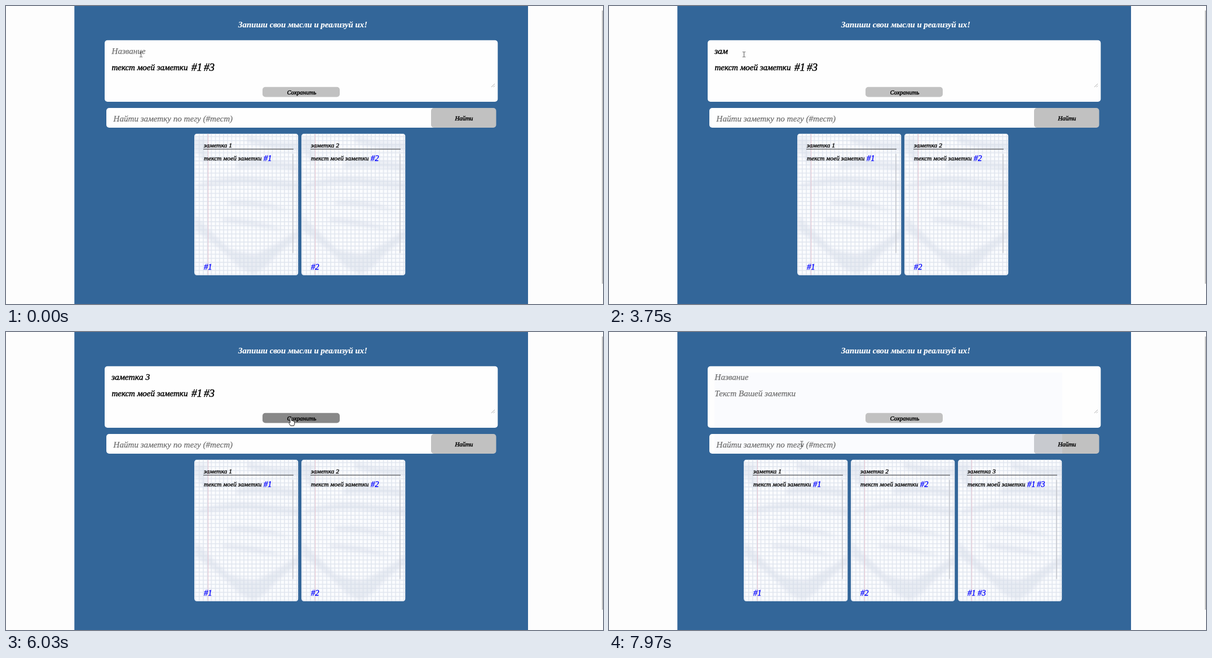
An HTML page that plays this animation: 1059 px wide and 529 px high, repeating every 8000 ms.

```html
<!DOCTYPE html>
<html lang="ru">
<head>
<meta charset="utf-8">
<title>Заметки</title>
<style>
  html, body { margin: 0; height: 100%; overflow: hidden; background: #fdfdfd; }
  svg { display: block; width: 100vw; height: 100vh; }
  text {
    font: italic 15px "Liberation Serif", serif;
    white-space: pre;
    stroke: currentColor; stroke-width: .45px; fill: currentColor;
  }
  .heading { font-size: 14.8px; font-weight: bold; color: #fff; stroke-width: .2px; }
  .hint { font-size: 15.1px; color: #707070; stroke-width: .25px; }
  .button { font-size: 10.9px; text-anchor: middle; }
  .small { font-size: 11.4px; stroke-width: .35px; }
  .tag { font-size: 19px; }
  .blue { font-size: 14.5px; color: #00f; stroke-width: .3px; }
</style>
</head>
<body>
<svg viewBox="0 0 1059 529">
  <defs>
    <pattern id="grid" x="91.6" y="160" width="7.2" height="7.2" patternUnits="userSpaceOnUse">
      <path d="M0 3.6H7.2M3.6 0V7.2" stroke="#d5dce8" stroke-opacity=".75" stroke-width="1.4"/>
    </pattern>
    <filter id="soft" x="-10%" y="-10%" width="120%" height="120%">
      <feGaussianBlur stdDeviation="3"/>
    </filter>
    <clipPath id="sheet"><rect width="184.5" height="251.5" rx="5"/></clipPath>
    <g id="paper" clip-path="url(#sheet)">
      <rect width="184.5" height="252" fill="#fbfcfe"/>
      <g fill="#bcc6da" opacity=".3" filter="url(#soft)">
        <path d="M5 90Q60 72 110 78T185 86V98Q140 94 105 90T5 96Z"/>
        <path d="M75 52Q120 42 182 54V66Q130 56 75 62Z"/>
        <path d="M95 4Q140 18 184 14V30Q140 30 95 16Z"/>
        <path d="M0 8H22V60Q12 35 0 30Z"/>
        <path d="M2 146Q30 175 62 205Q85 212 108 214Q145 200 184 170V186Q150 208 128 236L105 250L80 238Q50 204 2 172Z"/>
        <path d="M60 120Q110 112 170 138Q110 128 60 126ZM50 150Q110 150 160 172Q100 164 50 156Z"/>
      </g>
      <rect width="184.5" height="252" fill="url(#grid)"/>
      <path d="M24.5 0V252" stroke="#e6c3cf"/>
    </g>
    <g id="beam" fill="none" stroke="#444" stroke-width=".9">
      <path d="M-2.5 -4.5H-.8L0 -4L.8 -4.5H2.5M0 -4V4M-2.5 4.5H-.8L0 4L.8 4.5H2.5"/>
    </g>
    <path id="hand" fill="#fff" stroke="#111" stroke-width=".9" stroke-linejoin="round"
      d="M-1.5 -5.5Q0 -7 1 -5V-1Q2.4 -2 3 -.6Q4.5 -1 4.8 .3Q6.3 0 6.3 1.5V4.5L5 8H-.8L-3.7 3Q-3.5 1.2 -1.5 2.5Z"/>
    <path id="arrow" fill="#fff" stroke="#111" stroke-width=".8" d="M0 0V11L2.6 8.7L4.3 12.2L6 11.4L4.4 8H7.6Z"/>
  </defs>

  <rect width="1059" height="529" fill="#fdfdfd"/>
  <rect x="121.3" width="804.7" height="529" fill="#336699"/>
  <rect x="1057" y="8" width="2" height="485" fill="#c1c1c1"/>
  <text class="heading" x="412" y="38">Запиши свои мысли и реализуй их!</text>

  <rect x="175" y="60.8" width="697.3" height="109.2" rx="5" fill="#fefefe"/>
  <rect x="178" y="181" width="590" height="35" rx="5" fill="#fefefe"/>
  <rect x="754" y="181" width="115.5" height="35" rx="5" fill="#c1c1c1"/>
  <g id="tint">
    <path d="M187 72H804V170H187ZM187 181H754V216H187Z" fill="#fafbfe"/>
    <path d="M804 181V216H759Q754 216 754 211V186Q754 181 759 181Z" fill="#c8cacf"/>
  </g>
  <path d="M861 144L867 138M864.5 144L867 141.5" stroke="#999" stroke-width=".8"/>
  <rect id="save" x="455" y="143.8" width="137" height="17.7" rx="5"/>
  <text class="button" x="524.5" y="157">Сохранить</text>
  <text class="button" x="812.5" y="203">Найти</text>
  <text class="hint" x="190.5" y="204.5">Найти заметку по тегу (#тест)</text>

  <text class="hint" id="nameHint" x="187.5" y="84.5">Название</text>
  <text id="name" x="187" y="84.5" style="font-size:15.6px"></text>
  <path id="spelling" d="M187 87H244" stroke="#e33" stroke-width="1.2"/>
  <rect id="caret" y="67" width="1" height="23"/>

  <g id="body">
    <text x="187.5" y="114">текст моей заметки</text>
    <text class="tag" x="329" y="115">#1</text>
    <text class="tag" x="351" y="115">#3</text>
  </g>
  <text class="hint" id="bodyHint" x="187.5" y="114">Текст Вашей заметки</text>

  <g id="cards"></g>
  <use id="pointer"/>
</svg>

<script>
const LOOP = 8000, SENT = 6100;
const $ = id => document.getElementById(id);
const show = (id, on) => $(id).style.display = on ? "" : "none";

// [time, text in the title field, caret visible]
const typing = [
  [0, "", false], [100, "", true], [600, "", false], [1140, "", true],
  [1340, "з", true], [1480, "за", true], [1700, "зам", true],
  [1950, "замк", true], [2290, "замкт", true], [2490, "замктк", true],
  [2550, "замктка", true], [2700, "замктка ", true],
  [3080, "замктка", true], [3270, "замктк", true], [3370, "замкт", true],
  [3460, "замк", true], [3560, "зам", true], [3750, "зам", false],
  [4060, "заме", true], [4320, "замет", true], [4460, "заметк", true],
  [4550, "заметка", true], [4640, "заметка ", true],
  [4840, "заметка 3", true], [5350, "заметка 3", false], [SENT, "", false]
];

function card(number, tags) {
  const label = (x, y, tag) => `<text class="blue" x="${x}" y="${y}">${tag}</text>`;
  return `<g><use href="#paper"/>
    <path d="M16 27.5H176" stroke="#333"/>
    <path d="M175 36V212" stroke="#c3c6cc" stroke-width="1.5"/>
    <text class="small" x="17" y="24.5">заметка ${number}</text>
    <text class="small" x="17" y="47">текст моей заметки</text>
    ${tags.map((tag, i) => label(123 + 17 * i, 48, tag) + label(17 + 18 * i, 241.5, tag)).join("")}
  </g>`;
}
$("cards").innerHTML = card(1, ["#1"]) + card(2, ["#2"]) + card(3, ["#1", "#3"]);

// Pointer movement is sampled in discrete steps.
function glide(t, start, steps, from, to) {
  const step = Math.min(steps, Math.floor((t - start) / 60) + 1);
  const p = step / steps, eased = p * p * (3 - 2 * p);
  return from.map((v, i) => v + (to[i] - v) * eased);
}

function pointerAt(t) {
  if (t < 5600) return [239.5, 86];
  if (t < 6920) return glide(t, 5600, 8, [239.5, 86], [505.5, 158.5]);
  if (t < 7550) return [506, 159];
  return glide(t, 7550, 8, [506, 159], [342, 198.5]);
}

function draw(t) {
  const [, text, caretOn] = typing.findLast(([time]) => time <= t);
  const sent = t >= SENT;

  $("name").textContent = text;
  $("caret").setAttribute("x", 186 + (text ? $("name").getComputedTextLength() + .5 : 0));
  show("caret", caretOn);
  show("nameHint", !text);
  show("spelling", t >= 2760 && t < 3180);
  show("body", !sent);
  show("bodyHint", sent);
  show("tint", sent);

  [...$("cards").children].forEach((g, i) => {
    g.setAttribute("transform", `translate(${(sent ? 239 : 334) + 190 * i} 226.6)`);
    g.style.display = i < 2 || sent ? "" : "none";
  });

  const [x, y] = pointerAt(t);
  const hover = x > 455 && x < 592 && y > 144 && y < 161.5;
  const kind = hover ? "hand" : y > 144 && y < 181 ? "arrow" : "beam";
  $("save").setAttribute("fill", hover ? "#888" : "#c1c1c1");
  $("pointer").setAttribute("href", "#" + kind);
  $("pointer").setAttribute("transform", `translate(${x} ${y})`);
}

function frame() {
  draw(performance.now() % LOOP);
  requestAnimationFrame(frame);
}
frame();
</script>
</body>
</html>
```
